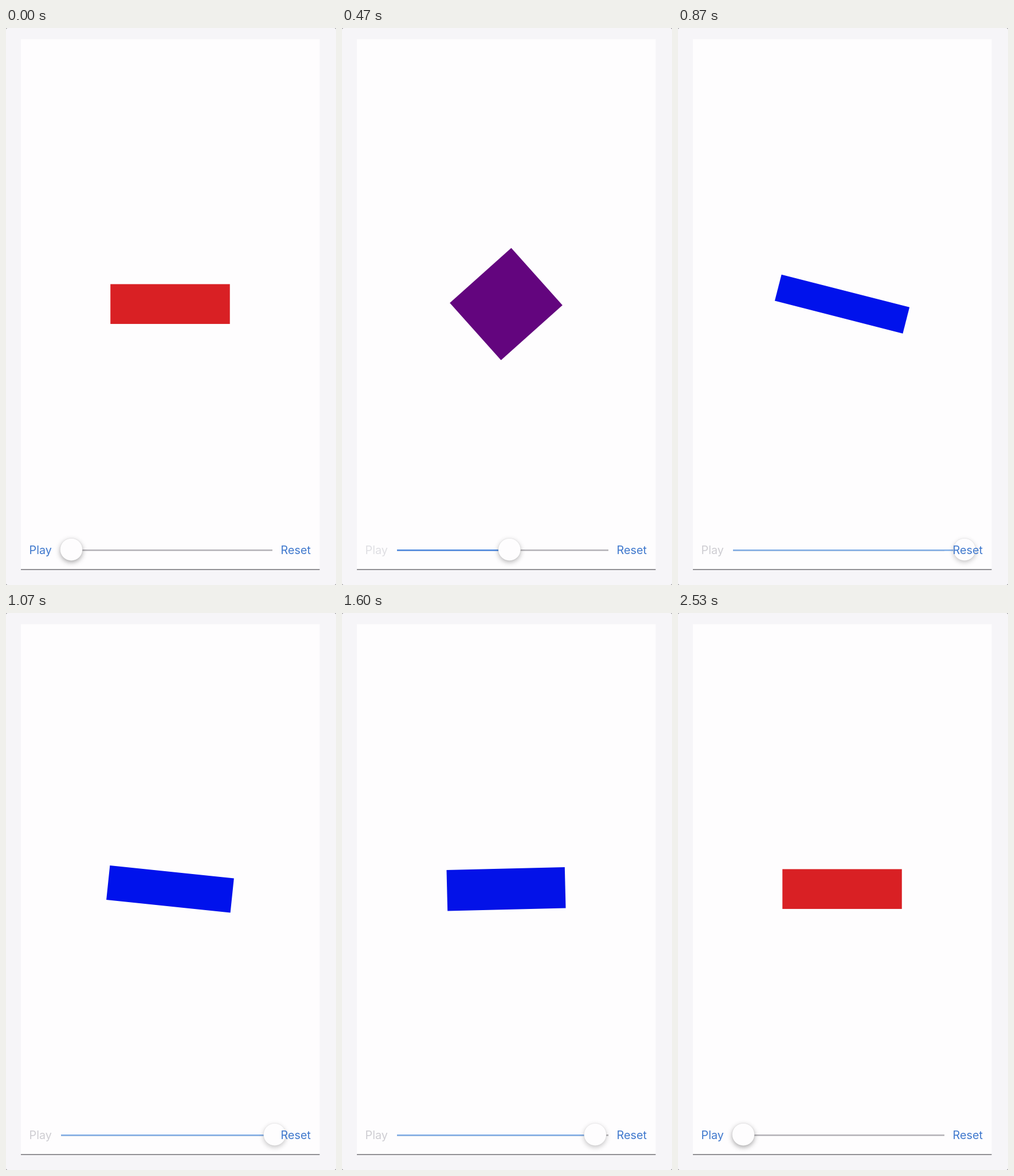
Animation of 576 by 973 pixels, one loop 2590 ms. Source, as an HTML page with a canvas:

```html
<!DOCTYPE html>
<html lang="en">
<head>
<meta charset="utf-8">
<title>Spring slider</title>
<style>
html, body { margin: 0; width: 100%; height: 100%; overflow: hidden; background: #77767a; }
canvas { display: block; width: 576px; height: 973px; border-radius: 3px; }
</style>
</head>
<body>
<canvas id="stage" width="576" height="973"></canvas>
<script>
const ctx = document.getElementById('stage').getContext('2d');
const LOOP = 2590, PRESS = 70, START = 253, RESET = 2370;
const RED = [217, 32, 36], PURPLE = [100, 5, 125], BLUE = [0, 18, 236];
const LINK = '#3f78cd';

const clamp = x => Math.min(1, Math.max(0, x));
const mix = (a, b, t) => a.map((v, i) => v + (b[i] - v) * clamp(t));
const rgb = c => `rgb(${c.map(Math.round)})`;

// Underdamped spring from 0 to 1, damping ratio 0.5
function spring(ms) {
  if (ms <= 0) return 0;
  const angle = 5.4 * ms / 1000, k = 1 / Math.sqrt(3);
  return 1 - Math.exp(-k * angle) * (Math.cos(angle) + k * Math.sin(angle));
}

function rect(x, y, w, h, color) {
  ctx.fillStyle = color;
  ctx.fillRect(x, y, w, h);
}

function label(text, x, color) {
  ctx.font = '19.8px Inter, Roboto, sans-serif';
  ctx.fillStyle = color;
  ctx.fillText(text, x, 919);
}

function drawShape(p) {
  const w = 208.5 - 139 * p, h = 69.5 + 139 * p;
  const color = p < 0.53 ? mix(RED, PURPLE, p / 0.53) : mix(PURPLE, BLUE, (p - 0.53) / 0.47);
  ctx.save();
  ctx.translate(286.5, 482.2);
  ctx.rotate(p * Math.PI / 2);
  rect(-w / 2, -h / 2, w, h, rgb(color));
  ctx.restore();
}

function drawSlider(p) {
  const x = 114 + 333 * p;
  rect(96, 911, 369, 2.5, '#b3b1b6');
  if (p > 0) rect(96, 911, x - 96, 2.5, rgb(mix([72, 133, 222], [128, 173, 230], (p - 0.5) * 2)));
  ctx.save();
  ctx.shadowColor = `rgba(0,0,0,${0.34 - 0.12 * clamp(p)})`;
  ctx.shadowBlur = 8;
  ctx.shadowOffsetY = 3;
  ctx.beginPath();
  ctx.arc(x, 911, 19.5, 0, 2 * Math.PI);
  ctx.fillStyle = '#fefdfe';
  ctx.fill();
  ctx.restore();
  ctx.strokeStyle = 'rgba(0,0,0,.06)';
  ctx.stroke();
}

function playColor(t) {
  if (t < PRESS || t >= RESET) return LINK;
  if (t < START) return '#d8e2f3';
  return rgb(mix([230, 230, 234], [206, 205, 210], (t - 400) / 250));
}

function draw(now) {
  const t = now % LOOP;
  const p = t < RESET ? spring(t - START) : 0;
  rect(0, 0, 576, 973, '#f6f5f8');
  rect(26, 19.5, 521.5, 926, '#fefdfe');
  rect(26, 945, 521.5, 2, '#929195');
  drawShape(p);
  drawSlider(p);
  label('Play', 40.5, playColor(t));
  label('Reset', 479.5, LINK);
}

const begin = performance.now();
function tick() {
  draw(performance.now() - begin);
  requestAnimationFrame(tick);
}
tick();
</script>
</body>
</html>
```
